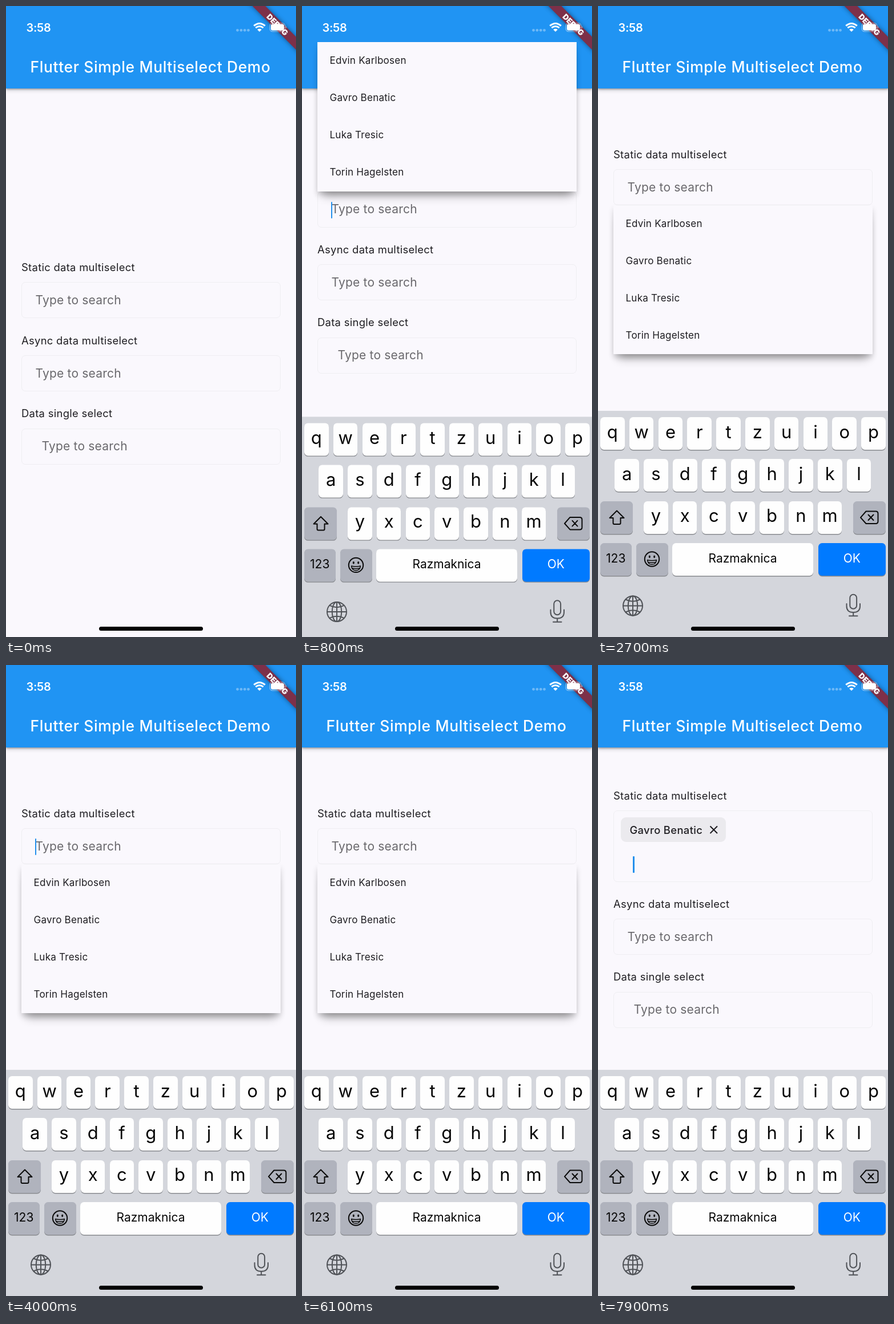
These frames come from a looping animation (508x1102 px, 8000 ms). An HTML page:

```html
<!DOCTYPE html>
<html lang="en">
<head>
<meta charset="utf-8">
<title>Multiselect demo</title>
<style>
  html, body { margin: 0; width: 100%; height: 100%; overflow: hidden; }
  body { font-family: Inter, Roboto, sans-serif; color: #1f1e22; }
  #stage { position: relative; width: 508px; height: 1102px; overflow: hidden; background: #faf8fd; }
  #stage div, #stage svg { position: absolute; }
  .text { white-space: pre; line-height: 30px; margin-top: -15px; }
  .bar { width: 508px; height: 143.8px; background: #2094f3; box-shadow: 0 1.5px 3px rgba(0,0,0,.3), 0 3px 7px rgba(0,0,0,.18); }
  .title { left: 42.6px; top: 106px; font-size: 26.4px; font-weight: 500; letter-spacing: .65px; color: #fff; }
  .clock { left: 35.5px; top: 37.5px; font-size: 20px; font-weight: 600; letter-spacing: -.3px; color: #fff; }
  #form { width: 508px; height: 1102px; }
  .label { left: 27px; font-size: 18.4px; letter-spacing: .3px; }
  .field { left: 27px; width: 454px; box-sizing: border-box; border: 1.6px solid #efeef2; border-radius: 7px; }
  .hint { font-size: 21px; letter-spacing: .2px; color: #69686c; }
  #typed { left: 51.5px; font-size: 21px; }
  #caret { width: 2.7px; height: 29px; border-radius: 1px; background: #2490ec; }
  #popup { left: 27px; width: 454px; background: #faf8fd;
    box-shadow: 0 16px 16px -9px rgba(0,0,0,.32), 0 6px 10px -1px rgba(0,0,0,.2); }
  .row { left: 0; width: 454px; height: 65.1px; }
  .row .text { left: 21.5px; top: 32px; font-size: 17.1px; letter-spacing: .2px; }
  #chip { left: 39.5px; width: 184px; height: 43px; border-radius: 9px; background: #ebeaee; }
  #chip .text { left: 16px; top: 21.5px; font-size: 18.4px; font-weight: 500; letter-spacing: .35px; }
  #keys { top: 707px; width: 508px; height: 395px; background: #d4d6dc; }
  .key { height: 57px; border-radius: 6.5px; background: #fefefe; box-shadow: 0 1.4px 0 #898b90; }
  .key .text { left: 0; width: 100%; text-align: center; color: #050505; font-size: 21px; top: 27.5px; }
  .key .letter { font-size: 31px; top: 25.5px; }
  .dark { background: #b0b3bd; }
  .blue { background: #007aff; }
  .key.blue .text { color: #fff; }
  .home { left: 163.3px; top: 1084.2px; width: 181.5px; height: 6.7px; border-radius: 4px; background: #000; }
  .ribbon { left: 508px; top: 0; width: 0; height: 0; transform: rotate(45deg); }
  .band { left: -62px; top: 37.9px; width: 124px; height: 16.3px; background: #7d3049; box-shadow: 0 0 8px rgba(0,0,0,.45);
    color: #fff; font-size: 13.4px; font-weight: 900; line-height: 16.3px; text-align: center; }
</style>
</head>
<body>
<div id="stage">
  <div class="bar"></div>
  <div class="text title">Flutter Simple Multiselect Demo</div>
  <div id="form"></div>
  <div id="keys">
    <svg width="508" height="395" style="z-index:1" fill="none" stroke="#0a0a0a" stroke-width="2" stroke-linejoin="round" stroke-linecap="round">
      <path d="M33 174.500L45.500 187H39.500V196Q39.500 198 37.500 198H28.500Q26.500 198 26.500 196V187H20.500Z"/>
      <path d="M469.500 175.500H486.500Q490.500 175.500 490.500 179.500V193Q490.500 197 486.500 197H469.500L460 186.300ZM473.500 181.500L482.500 191M482.500 181.500L473.500 191"/>
      <circle cx="94.500" cy="259" r="12.700"/>
      <g fill="#0a0a0a" stroke="none"><ellipse cx="90.300" cy="254.800" rx="1.500" ry="2.200"/><ellipse cx="98.700" cy="254.800" rx="1.500" ry="2.200"/></g>
      <path d="M86.500 260.500Q94.500 262.500 102.500 260.500Q101.500 268.500 94.500 268.500Q87.500 268.500 86.500 260.500ZM88.500 264.500Q94.500 266 100.500 264.500" stroke-width="1.500"/>
      <g stroke="#505358">
        <circle cx="61" cy="340.500" r="17"/>
        <ellipse cx="61" cy="340.500" rx="8.300" ry="17"/>
        <path d="M61 323.500V357.500M44 340.500H78M48.500 329.500Q61 336 73.500 329.500M48.500 351.500Q61 345 73.500 351.500"/>
        <rect x="441.300" y="320.800" width="11.800" height="25" rx="5.900"/>
        <path d="M435.500 337V341Q435.500 352 447.200 352Q459 352 459 341V337M447.200 352V358.300M440 358.300H454.500"/>
      </g>
    </svg>
  </div>
  <div class="home"></div>
  <div class="ribbon"><div class="band">DEBUG</div></div>
  <div class="text clock">3:58</div>
  <svg width="508" height="60" fill="#fff">
    <g opacity=".35"><circle cx="405.500" cy="42.300" r="2.400"/><circle cx="411.900" cy="42.300" r="2.400"/><circle cx="418.200" cy="42.300" r="2.400"/><circle cx="424.500" cy="42.300" r="2.400"/></g>
    <path d="M440.200 41.200Q444 38.400 447.800 41.200L444 45Z"/>
    <path d="M437.300 38.200Q444 32.800 450.700 38.200M434.200 34.700Q444 26.300 453.800 34.700" fill="none" stroke="#fff" stroke-width="2.900"/>
    <rect x="462.200" y="29.800" width="26.500" height="14.800" rx="4.500" fill="none" stroke="#fff" stroke-opacity=".45" stroke-width="1.300"/>
    <rect x="464" y="31.600" width="23" height="11.200" rx="3"/>
    <path d="M490 34.700Q492.600 37.200 490 39.700Z" opacity=".5"/>
  </svg>
</div>
<script>
const LOOP = 8000, KEYS_H = 395, FIELD_H = 63, CHIP_H = 61.5, ROW_H = 65.1;
const people = ["Edvin Karlbosen", "Gavro Benatic", "Luka Tresic", "Torin Hagelsten"];
const form = document.getElementById("form"), keys = document.getElementById("keys");

function add(parent, cls, text = "", style = {}) {
  const el = document.createElement("div");
  el.className = cls;
  el.textContent = text;
  for (const k in style) el.style[k] = px(style[k]);
  return parent.appendChild(el);
}
function named(id, cls, text) {
  const el = add(form, cls, text);
  el.id = id;
  return el;
}
const show = (el, on) => { el.style.display = on ? "" : "none"; };
function px(n) { return n + "px"; }

const groups = ["Static data multiselect", "Async data multiselect", "Data single select"].map((name, i) => ({
  label: add(form, "text label", name),
  field: add(form, "field"),
  hint: add(form, "text hint", "Type to search", { left: i === 2 ? 62.5 : 51.5 })
}));
const typed = named("typed", "text", "g");
const chip = named("chip", "");
add(chip, "text", people[1]);
chip.insertAdjacentHTML("beforeend",
  '<svg style="left:155px;top:14px" width="16" height="16"><path d="M1.500 1.500L14 14M14 1.500L1.500 14" stroke="#1c1b1f" stroke-width="2"/></svg>');
const popup = named("popup", "");
const rows = people.map(name => {
  const row = add(popup, "row");
  add(row, "text", name);
  return row;
});
const caret = named("caret", "");

function addKey(left, row, width, text, cls = "", textCls = "") {
  const key = add(keys, "key " + cls, "", { left, top: 11 + row * 73.3, width });
  add(key, "text " + textCls, text);
}
[["qwertzuiop", 4], ["asdfghjkl", 29.3], ["yxcvbnm", 80]].forEach(([chars, x], row) =>
  [...chars].forEach((c, i) => addKey(x + i * 50.8, row, 42.7, c, "", "letter")));
addKey(4, 2, 56.5, "", "dark");
addKey(447, 2, 57, "", "dark");
addKey(4, 3, 54.5, "123", "dark");
addKey(67, 3, 55.5, "", "dark");
addKey(130, 3, 247, "Razmaknica");
addKey(385.5, 3, 118.5, "OK", "blue");

// critically damped spring from 0 to 1, t in ms
function spring(t) {
  const x = Math.max(0, t) * 0.0183;
  return 1 - (1 + x) * Math.exp(-x);
}

function caretOpacity(t) {
  if (t < 500) return 0;
  if (t < 1690 || t >= 6700) return 1;
  const phase = ((t - 1690) % 835) / 835;
  if (phase < 0.15) return 1 - phase / 0.15;
  if (phase < 0.35) return 0;
  return Math.min(1, (phase - 0.35) / 0.15);
}

function render(t) {
  const hasText = t >= 6700 && t < 7400, picked = t >= 7400;
  const extra = picked ? CHIP_H : 0;
  keys.style.transform = `translateY(${KEYS_H * (1 - spring(t - 500))}px)`;

  let y = 456 - (KEYS_H * spring(t - 636) + extra) / 2;
  const top = y + 26.3;
  groups.forEach((g, i) => {
    const h = FIELD_H + (i ? 0 : extra);
    g.label.style.top = px(y);
    g.field.style.top = px(y + 26.3);
    g.field.style.height = px(h);
    g.hint.style.top = px(y + 58);
    y += h + 64.6;
  });
  show(groups[0].hint, !hasText && !picked);

  show(typed, hasText);
  typed.style.top = px(top + 31.7);
  show(chip, picked);
  chip.style.top = px(top + 12);

  caret.style.opacity = caretOpacity(t);
  caret.style.left = px(picked ? 61.2 : hasText ? 64 : 50.8);
  caret.style.top = px(top + (picked ? 79.5 : 18));

  let n = 0;
  rows.forEach((row, i) => {
    const match = !hasText || people[i].toLowerCase().includes("g");
    show(row, match);
    row.style.background = t >= 7100 && i === 1 ? "rgba(0,0,0,.04)" : "none";
    if (match) row.style.top = px(ROW_H * n++);
  });
  const height = n * ROW_H;
  show(popup, t >= 600 && t < 7200);
  popup.style.height = px(height);
  popup.style.top = px(t < 1000 ? top - height : top + FIELD_H);
}

const start = performance.now();
function tick() {
  render((performance.now() - start) % LOOP);
  requestAnimationFrame(tick);
}
tick();
</script>
</body>
</html>
```
